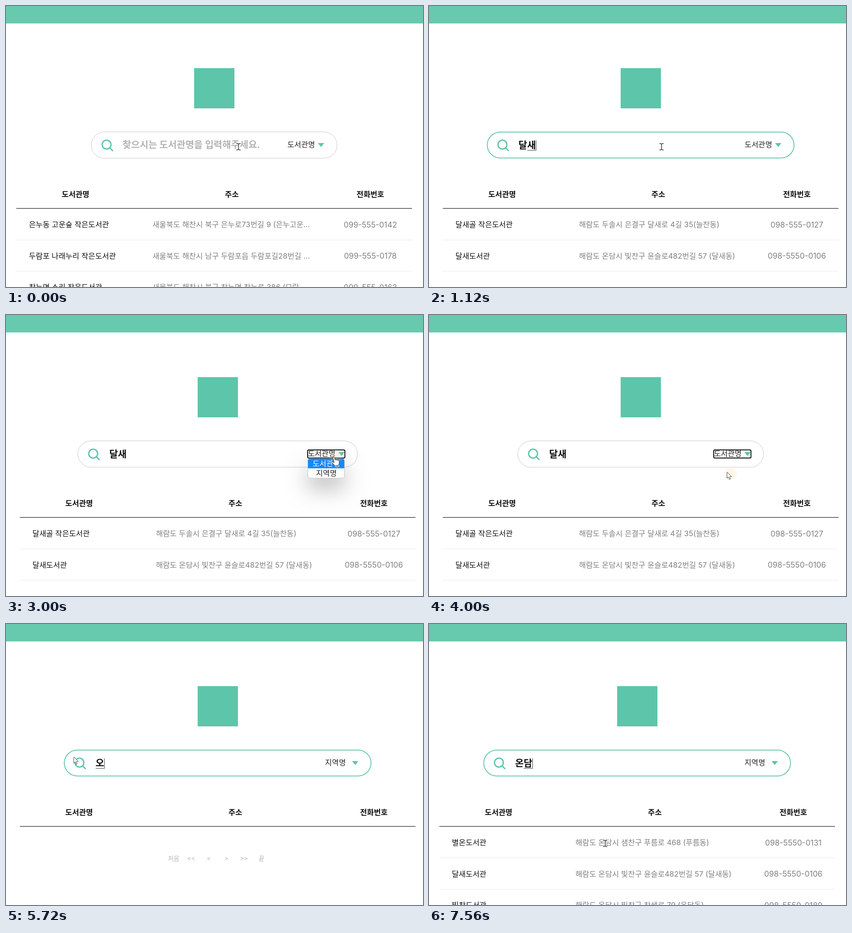
An HTML page with a canvas that plays this animation: 911x615 px, repeating every 7640 ms.

```html
<!DOCTYPE html>
<html lang="ko">
<head>
<meta charset="utf-8">
<title>도서관 검색</title>
<style>
html, body { margin: 0; width: 100%; height: 100%; overflow: hidden; background: #fff; }
canvas { display: block; width: 911px; height: 615px; }
</style>
</head>
<body>
<canvas id="stage"></canvas>
<script>
const W = 911, H = 615, LOOP = 7640;
const TEAL = '#5dc5aa', BLUE = '#1688fb', GREY = '#808080';
const FONT = 'Inter, "Noto Sans CJK KR", "Noto Sans CJK", sans-serif';
const SLIDE = 600;

const canvas = document.getElementById('stage');
const dpr = window.devicePixelRatio || 1;
canvas.width = W * dpr;
canvas.height = H * dpr;
const c = canvas.getContext('2d');

const LISTS = {
  none: [],
  all: [
    ['은누동 고운숲 작은도서관', '새울북도 해찬시 북구 은누로73번길 9 (은누고운...', '099-555-0142'],
    ['두람포 나래누리 작은도서관', '새울북도 해찬시 남구 두람포읍 두람포길28번길 ...', '099-555-0178'],
    ['찬누면 소리 작은도서관', '새울북도 해찬시 북구 찬누면 찬누로 386 (모람...', '099-555-0163']
  ],
  name: [
    ['달새골 작은도서관', '해람도 두솔시 은결구 달새로 4길 35(늘찬동)', '098-555-0127'],
    ['달새도서관', '해람도 온담시 빛찬구 윤슬로482번길 57 (달새동)', '098-5550-0106']
  ],
  region: [
    ['별온도서관', '해람도 온담시 샘찬구 푸름로 468 (푸름동)', '098-5550-0131'],
    ['달새도서관', '해람도 온담시 빛찬구 윤슬로482번길 57 (달새동)', '098-5550-0106'],
    ['빛찬도서관', '해람도 온담시 빛찬구 찬샘로 79 (온담동)', '098-5550-0189']
  ]
};

// Timed states: [start ms, value]
const TYPED = [[0, ''], [640, 'ㄷ'], [760, '다'], [920, '달'], [1000, '닰'], [1080, '달새'],
  [5360, 'ㅇ'], [5600, '오'], [5760, '온'], [5960, '온ㄷ'], [6160, '온다'], [6240, '온담']];
const SHOWN = [[0, 'all'], [720, 'none'], [840, 'all'], [960, 'name'],
  [5480, 'none'], [5840, 'region'], [6120, 'none'], [6360, 'region']];
const FOCUS = [[0, false], [80, true], [2840, false], [4300, true]];

// Pointer waypoints: time, x, y, shape
const POINTER = [
  [0, 508, 308, 'beam'], [1720, 508, 308, 'beam'], [1880, 540, 326, 'beam'],
  [2000, 590, 350, 'arrow'], [2200, 672, 360, 'arrow'], [2400, 712, 318, 'hand'],
  [2480, 716, 311, 'hand'], [3040, 716, 311, 'arrow'], [3440, 684, 318, 'arrow'],
  [3520, 680, 316, 'arrow'], [3640, 651, 344, 'arrow'], [4040, 651, 344, 'arrow'],
  [4140, 560, 370, 'arrow'], [4220, 380, 325, 'beam'], [4300, 300, 306, 'beam'],
  [4540, 190, 297, 'arrow'], [4640, 148, 291, 'arrow'], [6880, 148, 291, 'arrow'],
  [7000, 195, 310, 'beam'], [7120, 255, 345, 'arrow'], [7320, 345, 425, 'arrow'],
  [7480, 380, 472, 'beam'], [7560, 385, 480, 'beam'], [LOOP, 385, 480, 'beam']
];

const at = (steps, t) => steps.filter(s => s[0] <= t).pop()[1];
const clamp = v => Math.max(0, Math.min(1, v));
const mix = (a, b, p) => a + (b - a) * p;

// CSS "ease": cubic-bezier(.25, .1, .25, 1)
function ease(x) {
  if (x <= 0 || x >= 1) return clamp(x);
  const curve = (a, b, s) => 3 * a * s * (1 - s) ** 2 + 3 * b * s * s * (1 - s) + s ** 3;
  let lo = 0, hi = 1;
  for (let i = 0; i < 24; i++) {
    const mid = (lo + hi) / 2;
    if (curve(.25, .25, mid) < x) lo = mid; else hi = mid;
  }
  return curve(.1, 1, lo);
}

function text(str, x, y, size, color, weight = 400, align = 'left') {
  c.font = `${weight} ${size}px ${FONT}`;
  c.textAlign = align;
  c.fillStyle = color;
  c.fillText(str, x, y + size * .365);
  return c.measureText(str).width;
}

function rect(x, y, w, h, color) {
  c.fillStyle = color;
  c.fillRect(x, y, w, h);
}

function round(x, y, w, h, r) {
  c.beginPath();
  c.roundRect(x, y, w, h, r);
}

function shape(points) {
  c.beginPath();
  points.forEach(([x, y]) => c.lineTo(x, y));
  c.closePath();
}

function stroke(color, width) {
  c.strokeStyle = color;
  c.lineWidth = width;
  c.stroke();
}

function fill(color) {
  c.fillStyle = color;
  c.fill();
}

function table(rows, dx) {
  text('도서관명', 152 + dx, 412, 16.4, '#111', 700, 'center');
  text('주소', 493.4 + dx, 412, 16.4, '#111', 700, 'center');
  text('전화번호', 796 + dx, 412, 16.4, '#111', 700, 'center');
  rect(22.5 + dx, 442.2, 864.5, 1.7, '#5c5c5c');
  rows.forEach(([name, address, phone], i) => {
    const y = 478.5 + i * 68.4;
    text(name, 50 + dx, y, 16.4, '#111');
    text(address, 320 + dx, y, 16.4, GREY);
    text(phone, 796 + dx, y, 17, GREY, 400, 'center');
    rect(22.5 + dx, y + 33, 864.5, 1, '#ebebeb');
  });
  if (!rows.length) {
    ['처음', '<<', '<', '>', '>>', '끝'].forEach((label, i) =>
      text(label, 358.5 + i * 38.4 + dx, 513, 13.4, '#b5b5b5', 400, 'center'));
  }
}

function inputText(t, x, focused, pointer) {
  const typed = at(TYPED, t);
  if (!typed) {
    text('찾으시는 도서관명을 입력해주세요.', x - .5, 303.5, 20.6, '#b4b4b4', 700);
    if (focused) rect(x, 294, 1, 22, '#222');
    return;
  }
  const w = text(typed, x, 304.5, 20.6, '#111', 700);
  if (!focused) return;
  if (t >= 4300 && t < 5360) {
    const from = Math.max(x - .5, pointer.x);
    const width = x + w + .5 - from;
    if (width <= 0) return;
    c.save();
    c.beginPath();
    c.rect(from, 291, width, 26);
    c.clip();
    rect(from, 291, width, 26, '#2b8cf0');
    text(typed, x, 304.5, 20.6, '#fff', 700);
    c.restore();
    return;
  }
  const last = w / typed.length;
  rect(x + w - last, 315.5, last, 1, '#333');
  rect(x + w, 294, 1, 22.5, '#333');
}

function searchBar(t, dx, pointer) {
  const open = t < 2840 ? ease((t - 80) / SLIDE)
    : t < 4300 ? 1 - ease((t - 2840) / SLIDE)
    : ease((t - 4300) / SLIDE);
  const focused = at(FOCUS, t);
  const half = mix(269, 336, open);
  const left = 454.7 + dx - half, right = 454.7 + dx + half;

  const edge = focused ? .9 : .5;
  round(left + edge, 275 + edge, 2 * (half - edge), 58.6 - 2 * edge, 29);
  fill('#fff');
  stroke(focused ? TEAL : '#c9c9c9', focused ? 1.8 : 1);

  c.lineCap = 'round';
  c.beginPath();
  c.arc(left + 34, 303.4, 9.7, 0, 7);
  c.moveTo(left + 41.2, 310.6);
  c.lineTo(left + 47, 316.4);
  stroke(TEAL, 2.8);

  inputText(t, left + 69.2, focused, pointer);

  text(t < 4060 ? '도서관명' : '지역명', right - 78.8, 303.5, 16.4, '#222', 400, 'center');
  shape([[right - 42.5, 300], [right - 28.5, 300], [right - 35.5, 308.5]]);
  fill(TEAL);
  if (t >= 2840 && t < 4300) {
    round(right - 109.4, 295.3, 81.4, 17.8, 2.5);
    stroke('#111', 2);
  }
  if (t >= 2760 && t < 3840) menu(right - 109, pointer.y);
}

function menu(x, pointerY) {
  const pick = pointerY > 332 ? 1 : 0;
  c.save();
  c.shadowColor = 'rgba(0,0,0,.28)';
  c.shadowBlur = 48 * dpr;
  c.shadowOffsetY = 22 * dpr;
  round(x, 314, 80, 43, 5);
  fill('#fff');
  c.restore();
  c.save();
  round(x, 314, 80, 43, 5);
  c.clip();
  rect(x, 314 + 21.5 * pick, 80, 21.5, BLUE);
  ['도서관명', '지역명'].forEach((label, i) =>
    text(label, x + 40.5, 325 + i * 21, 16.4, i === pick ? '#fff' : '#222', 400, 'center'));
  c.restore();
  round(x, 314, 80, 43, 5);
  stroke('#b9b9b9', .8);
}

function halo(t, start, x, y) {
  const p = (t - start) / 420;
  if (p < 0 || p > 1) return;
  const g = c.createRadialGradient(x, y, 0, x, y, 16);
  g.addColorStop(0, 'rgba(255,215,140,.4)');
  g.addColorStop(.7, 'rgba(255,215,170,.3)');
  g.addColorStop(1, 'rgba(245,220,235,0)');
  c.globalAlpha = 1 - p * .7;
  rect(x - 16, y - 16, 32, 32, g);
  c.globalAlpha = 1;
}

function pointerAt(t) {
  const i = POINTER.findIndex(p => p[0] > t);
  const a = POINTER[i - 1], b = POINTER[i];
  const p = (t - a[0]) / (b[0] - a[0]);
  return { x: mix(a[1], b[1], p), y: mix(a[2], b[2], p), kind: a[3] };
}

const cursors = {
  beam() {
    c.beginPath();
    for (const s of [-1, 1]) {
      c.moveTo(-4, 7 * s);
      c.quadraticCurveTo(0, 7 * s, 0, 5 * s);
      c.quadraticCurveTo(0, 7 * s, 4, 7 * s);
    }
    c.moveTo(0, -6);
    c.lineTo(0, 6);
    stroke('#fff', 3);
    stroke('#222', 1.3);
  },
  arrow() {
    shape([[0, 0], [0, 13.5], [3, 10.8], [5.3, 16], [7.6, 15], [5.4, 10], [9.5, 9.7]]);
    fill('#fff');
    stroke('#444', 1);
  },
  hand() {
    c.beginPath();
    c.moveTo(-1.5, 1);
    c.quadraticCurveTo(0, -1.5, 1.8, 1);
    c.lineTo(2.8, 6);
    c.quadraticCurveTo(5, 4.6, 6, 6.4);
    c.quadraticCurveTo(8, 5.2, 9, 7.2);
    c.quadraticCurveTo(11.4, 6.4, 12, 9);
    c.quadraticCurveTo(12.8, 14, 10, 19);
    c.lineTo(2.5, 19);
    c.quadraticCurveTo(-1, 15, -4, 11.5);
    c.quadraticCurveTo(-3.6, 9, .6, 12);
    c.closePath();
    fill('#fff');
    stroke('#333', 1);
  }
};

function draw(t) {
  const shown = at(SHOWN, t);
  // Short lists lose the scrollbar, which shifts the page.
  const dx = shown === 'all' || shown === 'region' ? 0 : 7.7;
  const pointer = pointerAt(t);

  c.setTransform(dpr, 0, 0, dpr, 0, 0);
  rect(0, 0, W, H, '#fff');
  rect(0, 0, W, 38.2, '#67c9ae');
  rect(411 + dx, 136, 88, 88, TEAL);
  table(LISTS[shown], dx);
  searchBar(t, dx, pointer);

  halo(t, 2720, 721, 310);
  halo(t, 3800, 659, 347);
  c.save();
  c.translate(pointer.x, pointer.y);
  cursors[pointer.kind]();
  c.restore();
}

const begin = performance.now();
function frame() {
  draw((performance.now() - begin) % LOOP);
  requestAnimationFrame(frame);
}
frame();
</script>
</body>
</html>
```
